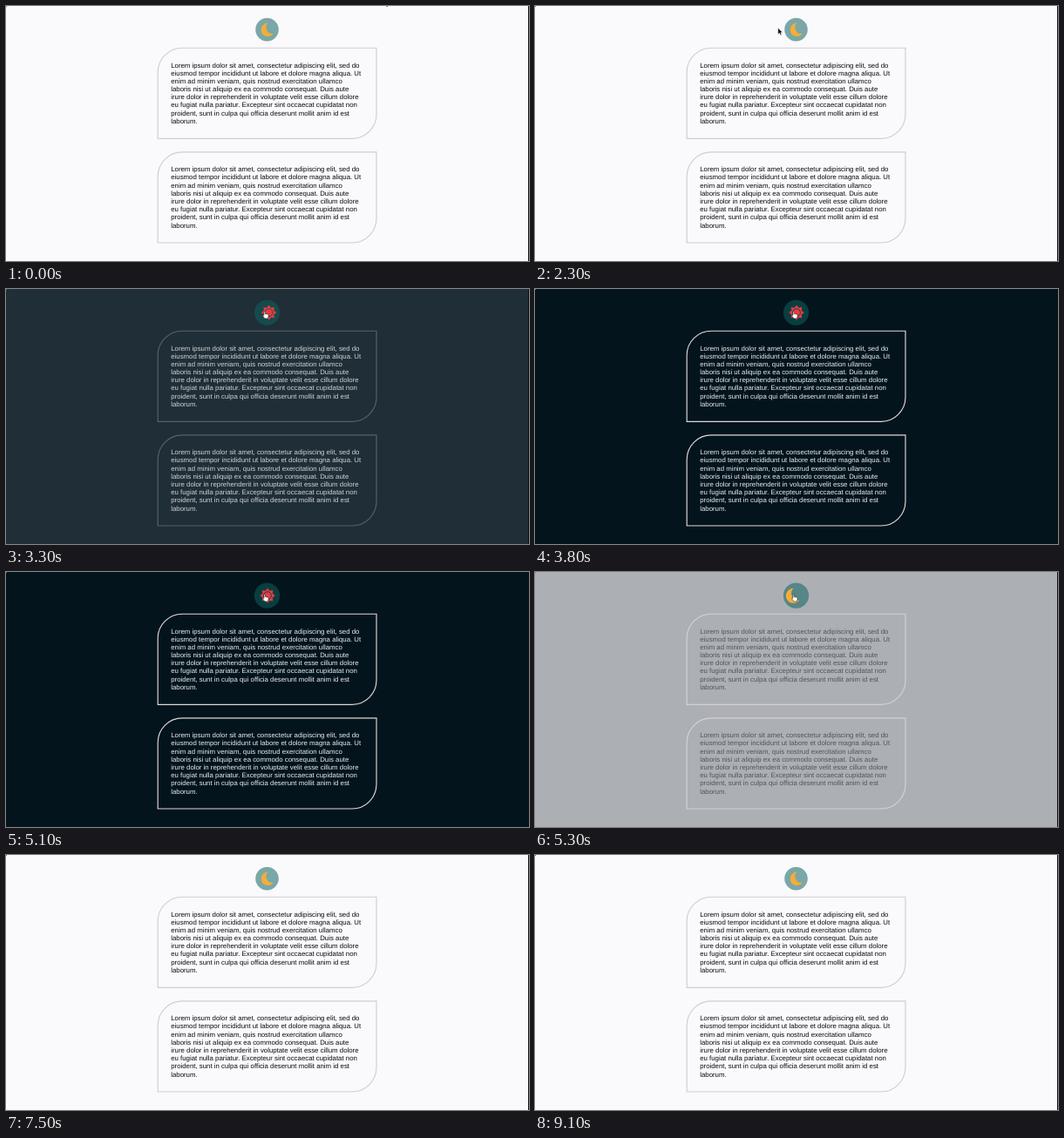
These frames come from a looping animation (600x293 px, 9.3 s). An HTML page:

```html
<!DOCTYPE html>
<html lang="en">
<head>
<meta charset="utf-8">
<title>Theme switch</title>
<style>
  html, body { margin: 0; width: 100%; height: 100%; overflow: hidden; }
  svg { display: block; width: 600px; height: 293px; }
  text {
    font: 7.84px "Liberation Sans", Arial, sans-serif;
    text-rendering: geometricPrecision;
    white-space: pre;
  }
</style>
</head>
<body>
<svg viewBox="0 0 600 293">
  <defs>
    <clipPath id="round"><circle r="13.3"/></clipPath>
    <g id="card">
      <path d="M174.2 152.3V76.2A28 28 0 0 1 202.2 48.2H425V124.3A28 28 0 0 1 397 152.3Z"
        fill="none" stroke-width="1.15"/>
      <g id="copy" stroke="none"></g>
    </g>
  </defs>
  <rect id="page" width="600" height="293"/>
  <g id="cards">
    <use href="#card"/>
    <use href="#card" y="119.7"/>
  </g>
  <g id="button">
    <circle id="disc" r="13.3"/>
    <g clip-path="url(#round)">
      <path id="moon" fill="#f4ad38" d="M1 -7.5A7.7 7.7 0 1 0 7.3 4.5A7.1 7.1 0 0 1 1 -7.5Z"/>
      <g id="sun">
        <path id="rays" fill="#e43d43"/>
        <circle id="gap" r="4" fill="none" stroke-width=".8"/>
      </g>
    </g>
  </g>
  <rect x="599" width="1" height="293" fill="#111"/>
  <rect width="1" height="1" fill="#777"/>
  <path id="arrow" d="M0 0V7.2L1.7 5.7L2.9 8.3L4.1 7.8L3 5.2H5.2Z"
    fill="#0b0b0d" stroke="#fff" stroke-width=".4"/>
  <path id="hand" fill="#fff" stroke="#111" stroke-width=".5" stroke-linejoin="round"
    d="M1 .6Q1.7 -.2 2.4 .6V3.2L5.6 3.9Q6.4 4.2 6.2 5.2L5.4 8.6H2L-.5 5.4Q-.4 4.3 1 5Z"/>
</svg>
<script>
const LOOP = 9300, STEP = 100, FADE = 500;
const DARKEN = 3000, LIGHTEN = 5100, ENTER = 2500, LEAVE = 5900;
const LINES = [
  "Lorem ipsum dolor sit amet, consectetur adipiscing elit, sed do",
  "eiusmod tempor incididunt ut labore et dolore magna aliqua. Ut",
  "enim ad minim veniam, quis nostrud exercitation ullamco",
  "laboris nisi ut aliquip ex ea commodo consequat. Duis aute",
  "irure dolor in reprehenderit in voluptate velit esse cillum dolore",
  "eu fugiat nulla pariatur. Excepteur sint occaecat cupidatat non",
  "proident, sunt in culpa qui officia deserunt mollit anim id est",
  "laborum."
];
const COLORS = {
  page: [[250, 249, 252], [4, 20, 29]],
  text: [[10, 11, 16], [235, 239, 240]],
  disc: [[122, 167, 167], [9, 62, 64]],
  line: [[207, 206, 211], [222, 217, 214]]
};
const DIM_LINE = [74, 83, 90];
// Pointer stops: time, x, y
const PATH = [
  [1200, 434, -7], [1300, 420, 0], [1500, 340, 20], [1700, 284, 24],
  [1900, 276, 25], [2300, 278.8, 25.3], [2500, 290, 25.5], [2800, 295, 25.3],
  [5800, 295, 25.3], [5900, 284, 26], [6100, 247.6, 27], [6400, 190, 12], [6700, 150, -12]
];

const $ = id => document.getElementById(id);
const clamp = v => Math.min(1, Math.max(0, v));
const lerp = (a, b, k) => a + (b - a) * k;
const mix = (a, b, k) => a.map((v, i) => lerp(v, b[i], k));
const rgb = c => `rgb(${c.map(Math.round)})`;
const set = (id, name, value) => $(id).setAttribute(name, value);
const show = (id, on) => set(id, "visibility", on ? "visible" : "hidden");

// The CSS "ease" curve, solved by bisection
function ease(x) {
  if (x <= 0 || x >= 1) return clamp(x);
  const curve = (a, b, s) => 3 * a * s * (1 - s) ** 2 + 3 * b * s * s * (1 - s) + s ** 3;
  let lo = 0, hi = 1;
  for (let i = 0; i < 24; i++) {
    const mid = (lo + hi) / 2;
    if (curve(.25, .25, mid) < x) lo = mid; else hi = mid;
  }
  return curve(.1, 1, lo);
}

function pointer(t) {
  const next = PATH.findIndex(p => p[0] > t);
  if (next === 0) return PATH[0].slice(1);
  if (next < 0) return PATH[PATH.length - 1].slice(1);
  const a = PATH[next - 1], b = PATH[next];
  return mix(a, b, (t - a[0]) / (b[0] - a[0])).slice(1);
}

function build() {
  LINES.forEach((line, i) => {
    const el = document.createElementNS("http://www.w3.org/2000/svg", "text");
    el.setAttribute("x", 189.2);
    el.setAttribute("y", 70.5 + i * 9.19);
    el.textContent = line;
    $("copy").append(el);
  });
  const points = Array.from({ length: 16 }, (_, i) => {
    const a = i * Math.PI / 8, r = i % 2 ? 5.6 : 7.9;
    return `${r * Math.cos(a)} ${r * Math.sin(a)}`;
  });
  set("rays", "d", `M${points.join("L")}Z`);
}

function draw(now) {
  const t = Math.floor(now % LOOP / STEP) * STEP;
  const toDark = ease((t - DARKEN) / FADE);
  const toLight = ease((t - LIGHTEN) / FADE);
  const dark = toDark - toLight;
  const color = name => mix(...COLORS[name], dark);

  let line = color("line");
  if (t < LIGHTEN) {
    const rise = clamp((t - DARKEN - 300) / FADE);
    line = mix(mix(COLORS.line[0], DIM_LINE, toDark), COLORS.line[1], rise);
  }
  set("page", "fill", rgb(color("page")));
  set("cards", "fill", rgb(color("text")));
  set("cards", "stroke", rgb(line));
  set("disc", "fill", rgb(color("disc")));
  set("gap", "stroke", rgb(color("disc")));

  const hover = t >= ENTER && t < LEAVE;
  const grow = ease((t - ENTER) / 200) - ease((t - LEAVE) / 200);
  set("button", "transform", `translate(299.5 27.1) scale(${1 + .1 * grow})`);

  const night = t > DARKEN && t <= LIGHTEN;
  show("sun", night);
  show("moon", !night);
  set("sun", "transform", `translate(${.5 + 12 * (1 - toDark)} 0)`);
  set("moon", "transform", `translate(${t > LIGHTEN ? -12 * (1 - toLight) : 0} 0)`);

  const at = `translate(${pointer(t)})`;
  show("arrow", !hover);
  show("hand", hover);
  set("arrow", "transform", at);
  set("hand", "transform", at);
}

build();
const start = performance.now();
function tick() {
  draw(performance.now() - start);
  requestAnimationFrame(tick);
}
tick();
</script>
</body>
</html>
```
